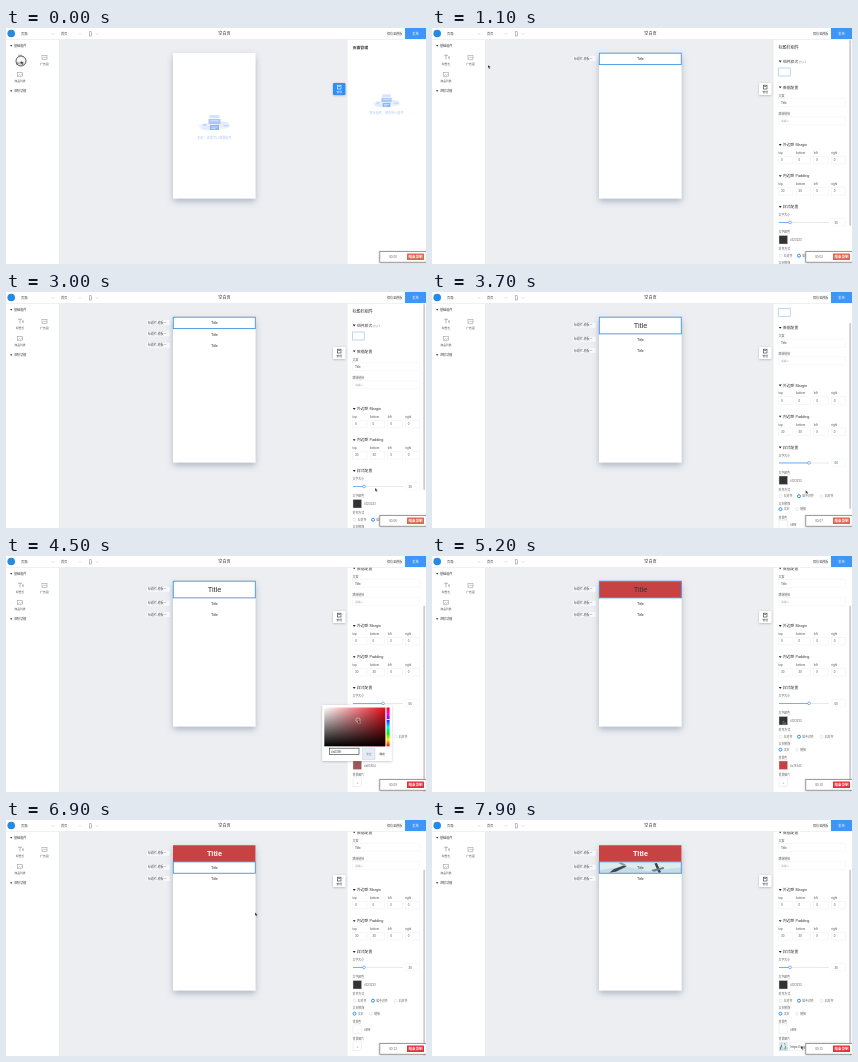
Write an HTML page that moves like this. It is 420 by 236 pixels and loops after 8000 ms.

```html
<!DOCTYPE html>
<html lang="en">
<head>
<meta charset="utf-8">
<title>Page builder</title>
<style>
html, body { margin: 0; width: 100%; height: 100%; overflow: hidden; background: #fff; }
svg { display: block; width: 100vw; height: 100vh; font-family: "Liberation Sans", "Noto Sans CJK SC", "Noto Sans CJK", sans-serif; }
</style>
</head>
<body>
<svg id="stage" viewBox="0 0 420 236">
  <defs>
    <linearGradient id="sat"><stop stop-color="#fff"/><stop offset="1" stop-color="#e5101c"/></linearGradient>
    <linearGradient id="dark" x2="0" y2="1"><stop stop-color="#000" stop-opacity="0"/><stop offset="1"/></linearGradient>
    <linearGradient id="hue" x2="0" y2="1">
      <stop stop-color="#f00"/><stop offset=".17" stop-color="#f0f"/><stop offset=".33" stop-color="#22f"/>
      <stop offset=".5" stop-color="#0ef"/><stop offset=".67" stop-color="#0e0"/><stop offset=".83" stop-color="#fe0"/><stop offset="1" stop-color="#f00"/>
    </linearGradient>
    <filter id="shadow" x="-30%" y="-30%" width="160%" height="160%"><feDropShadow dx="0" dy="3" stdDeviation="3" flood-color="#64748c" flood-opacity=".45"/></filter>
    <filter id="soft" x="-30%" y="-30%" width="160%" height="160%"><feDropShadow dx="0" dy=".6" stdDeviation="1" flood-opacity=".25"/></filter>
    <clipPath id="panelClip"><rect x="341" y="11.5" width="79" height="225"/></clipPath>
  </defs>
  <g id="scene"></g>
</svg>
<script>
const LOOP = 8000, STEP = 100, BLUE = '#2f8ff0', INK = '#444', PALE = '#a9c5f3';
const scene = document.getElementById('scene');

const rect = (x, y, w, h, fill = 'none', more = '') =>
  `<rect x="${x}" y="${y}" width="${w}" height="${h}" fill="${fill}" ${more}/>`;
const circle = (x, y, r, fill = 'none', more = '') =>
  `<circle cx="${x}" cy="${y}" r="${r}" fill="${fill}" ${more}/>`;
const path = (d, stroke = INK, width = .5, fill = 'none') =>
  `<path d="${d}" stroke="${stroke}" stroke-width="${width}" fill="${fill}"/>`;
const text = (x, y, s, size = 3.1, fill = INK, more = '') =>
  `<text x="${x}" y="${y}" font-size="${size}" fill="${fill}" ${more}>${s}</text>`;
const mid = (x, y, s, size, fill, more = '') => text(x, y, s, size, fill, `text-anchor="middle" ${more}`);
const edge = (color, w = .4) => `stroke="${color}" stroke-width="${w}"`;
const chevron = x => path(`M${x} 5.4l1 1 1-1`, '#999', .4);
const heading = (y, s) => path(`M346.8 ${y - 2.2}h2.8l-1.4 1.8z`, 'none', 0, '#222') + text(351, y, s, 3.8, '#333');

// Linear interpolation through rows of [time, ...values]
function follow(rows, t) {
  const i = rows.findIndex(r => r[0] > t);
  if (i < 0) return rows.at(-1).slice(1);
  if (i === 0) return rows[0].slice(1);
  const a = rows[i - 1], b = rows[i], k = (t - a[0]) / (b[0] - a[0]);
  return a.slice(1).map((v, j) => v + (b[j + 1] - v) * k);
}

const CURSOR = [
  [0, 15, 33], [200, 60, 40], [600, 205, 60], [800, 205, 40], [1100, 56, 37], [1200, 15, 32], [1300, 15, 32],
  [1600, 200, 42], [1800, 53, 39], [1950, 15, 32], [2050, 15, 32], [2400, 200, 54], [2700, 212, 32],
  [3000, 369, 196], [3100, 358, 195], [3500, 377, 195], [3800, 372, 200], [4000, 351, 209], [4300, 345, 175],
  [4500, 352, 164], [4700, 372, 158], [4900, 376, 198], [5200, 351, 165], [5500, 340, 190], [5900, 362, 182],
  [6200, 319, 172], [6500, 376, 217], [6800, 215, 48], [7200, 351, 226], [7900, 369, 226]
];
const SCROLL = [[3550, 0], [3850, 47]];
const SIZE = [[3100, 3.7], [3500, 7.4]];

function state(t) {
  const drags = [[0, 600], [1250, 1600], [2000, 2400]];
  const count = drags.filter(d => t >= d[1]).length;
  const big = follow(SIZE, t)[0];
  const red = t >= 4900, white = t >= 6500, photo = t >= 7500;
  return {
    t, count, big, red, white, photo,
    drag: drags.some(d => t >= d[0] && t < d[1]),
    selected: t >= 6800 ? 1 : t >= 2700 ? 0 : count - 1,
    scroll: follow(SCROLL, t)[0],
    picker: t >= 4000 && t < 4900 ? 'back' : t >= 5300 && t < 6500 ? 'ink' : '',
    cursor: follow(CURSOR, t)
  };
}

function header() {
  return rect(0, 0, 420, 11, '#fff') + rect(0, 11, 420, .5, '#dfe2e8') + circle(5.2, 5.5, 3.8, '#228be6') +
    text(15, 7, '页面:', 3.2) + chevron(46) + text(55, 7, '首页', 3.2) + chevron(73) +
    rect(83.2, 3.8, 2.6, 4.2, 'none', edge('#666')) + chevron(90) +
    mid(218.5, 7.4, '空白页', 4.1, '#333') + text(381, 7, '保存至模板', 3.1) +
    rect(399, 0, 21, 11, '#3c97f8') + mid(409.5, 7, '发布', 3.2, '#fff');
}

function sidebar() {
  const image = (x, y) => rect(x - 2.5, y - 2, 5, 4, 'none', edge('#777')) + path(`M${x - 2} ${y + 1.3}l1.5-1.6 1 .9 1-.9 1 1.4`, '#777', .35);
  return rect(0, 11.5, 53, 225, '#fff') + rect(53, 11.5, .4, 225, '#dfe2e8') +
    path('M4 17h2.4l-1.2 1.6z', 'none', 0, '#222') + text(8, 19, '基础组件', 3.1, '#333') +
    path('M12 27.2h4M14 27.2v4.2M16 29h2M17 29v2.4', '#777', .5) + mid(14, 36.6, '标题栏', 2.8) +
    image(38.5, 29.2) + mid(38.5, 36.6, '广告图', 2.8) +
    image(14, 46.6) + mid(14, 53.6, '商品列表', 2.8) +
    path('M4 62.2h2.4l-1.2 1.6z', 'none', 0, '#222') + text(8, 64.3, '进阶功能', 3.1, '#333');
}

function emptyArt(x, y, k) {
  const blob = (dx, dy, rx, ry, fill) => `<ellipse cx="${dx}" cy="${dy}" rx="${rx}" ry="${ry}" fill="${fill}"/>`;
  return `<g transform="translate(${x} ${y}) scale(${k})">` + blob(0, 2, 16, 3.5, '#edf3fd') + blob(-7, 4, 7, 2, '#e2ecfc') +
    blob(7, 0, 8, 2.4, '#e2ecfc') + rect(-5, -9, 10, 3.2, '#d5e4fb') + rect(-6, -5, 12, 5, '#a9c8f7') +
    rect(-4.5, 1, 9, 5, '#8db5f4') + path('M-4-3.2H4M-3 3H3M-3 4.6H1', '#e9f1fe', .7) +
    rect(-12, 0, 4, 2, '#c4d9fa') + rect(9, 1, 5, 1.6, '#c4d9fa') + '</g>';
}

function photoArt(y, x = 167.5, w = 82, h = 11.5) {
  const px = f => x + f * w, py = f => y + f * h;
  const shape = (fill, pts) => `<polygon fill="${fill}" points="${pts.map(p => px(p[0]) + ',' + py(p[1])).join(' ')}"/>`;
  return rect(x, y, w, h, '#dcecef') + shape('#c5dce2', [[0, .7], [.3, .4], [.6, .8], [1, .5], [1, 1], [0, 1]]) +
    shape('#40484b', [[.12, .95], [.17, .65], [.3, .3], [.33, .4], [.2, .85]]) +
    shape('#8a9899', [[.23, .1], [.27, .05], [.33, .3], [.3, .35]]) +
    shape('#394346', [[.67, .15], [.7, .1], [.75, .9], [.72, .95]]) +
    shape('#727f81', [[.63, .7], [.78, .45], [.79, .6], [.66, .85]]);
}

function phone(s) {
  let out = rect(53.4, 11.5, 288, 225, '#eceef2') + rect(167, 25, 82.5, 145.5, '#fff', 'filter="url(#shadow)"');
  if (!s.count) return out + emptyArt(208.5, 96, 1) + mid(208.5, 111.3, '你好，这里可以放置组件', 3.1, PALE);
  let y = 25.2, outline = '';
  for (let i = 0; i < s.count; i++) {
    const size = i ? 3.7 : s.big, h = 11.4 + (size - 3.7) * 1.42;
    if (!i && s.red) out += rect(167, y, 82.5, h, '#c74343');
    if (i === 1 && s.photo) out += photoArt(y);
    const white = !i && s.white;
    out += mid(208.5, y + h / 2 + size * .35, 'Title', size, white ? '#fff' : '#333', white ? 'font-weight="bold"' : '');
    const ty = y + h / 2 - 2.4;
    out += rect(141, ty - .5, 22.5, 5, '#f7f8fa', 'rx=".6"') + text(142, ty + 3, '标题栏-模板一', 2.9, '#555');
    if (i === s.selected) outline = rect(167.3, y, 82, h, 'none', edge('#3f92e6', .9));
    y += h;
  }
  return out + outline;
}

function manageButton(s) {
  const on = !s.count, c = on ? '#fff' : '#333';
  return rect(327, 55, 12.4, 12, on ? BLUE : '#fff', 'rx="1" filter="url(#soft)"') +
    rect(331.6, 57.2, 3.4, 3.8, 'none', edge(c, .6)) + path('M332.3 58.5h2', c, .6) + mid(333.2, 65, '管理', 2.7, c);
}

function fourFields(y, title, values) {
  return heading(y, title) + ['top', 'bottom', 'left', 'right'].map((name, i) => {
    const x = 346.5 + i * 17.6;
    return text(x, y + 7.6, name, 3, '#555') + rect(x, y + 10, 14.5, 7.6, '#fff', edge('#e9ebef')) +
      text(x + 2.5, y + 15, values[i], 3, '#555');
  }).join('');
}

function radios(y, options) {
  return options.map(([x, name, on]) =>
    circle(x, y - 1.1, 1.5, '#fff', edge(on ? BLUE : '#ccc', on ? 1 : .4)) + text(x + 3.2, y, name, 2.9, '#555')).join('');
}

function panel(s) {
  let out = rect(341, 11.5, 79, 225, '#fff') + rect(341, 11.5, .4, 225, '#dfe2e8');
  if (!s.count) return out + text(346.5, 21, '页面管理', 3.9, '#333', 'font-weight="bold"') +
    emptyArt(380.5, 74, .85) + mid(380.5, 86.3, '暂无组件，请先拖入组件', 3.1, PALE);
  const first = s.selected === 0, size = first ? s.big : 3.7;
  const knob = 358 + (size - 3.7) / 3.7 * 19;
  const picking = s.picker === 'back';
  const back = !first ? '#ffffff' : s.red ? '#c74343' : picking && s.t > 4200 ? '#a05654' : '#ffffff';
  const ink = first && (s.white || s.picker === 'ink') ? '#ffffff' : '#323233';
  const swatch = (y, fill, label) => rect(347, y, 8.6, 8.5, fill, edge('#ddd')) + text(358, y + 5.6, label, 3, '#666');
  out += `<g clip-path="url(#panelClip)"><g transform="translate(0 ${-s.scroll})">` +
    text(346.5, 21, '标题栏组件', 4.1, '#333', 'font-weight="500"') +
    heading(34.8, '组件样式') + text(367, 34.6, '默认1', 2.8, '#999') +
    rect(346.7, 40, 11.5, 8, '#fff', edge('#8abcf2', .6)) +
    heading(60.7, '数据配置') + text(346.5, 68.6, '文案', 2.9, '#555') +
    rect(346.5, 70.6, 67, 8, '#fff', edge('#eceef1')) + text(349, 75.8, 'Title', 3.1) +
    text(346.5, 86.6, '跳转链接', 2.9, '#555') + rect(346.5, 88.4, 67, 8, '#fff', edge('#eceef1')) + text(349, 93.7, '请输入', 2.8, '#aaa') +
    fourFields(118.3, '外边距 Margin', [0, 0, 0, 0]) + fourFields(149.4, '内边距 Padding', [30, 30, 0, 0]) +
    heading(180.3, '样式配置') + text(346.5, 188, '文字大小', 2.9, '#555') +
    rect(347, 194, 50, .9, '#e4e7ed') + rect(347, 194, knob - 347, .9, '#67acf5') +
    circle(knob, 194.4, 1.4, '#fff', edge(BLUE, .6)) +
    rect(400, 190.5, 13.5, 7.4, '#fff', edge('#eceef1')) + text(402.5, 195.6, Math.round(36 + (size - 3.7) * 8), 3, '#555') +
    text(346.5, 205.4, '文字颜色', 2.9, '#555') + swatch(207.5, ink, s.white && first ? ink : '#323233') +
    text(346.5, 222.4, '对齐方式', 2.9, '#555') + radios(228.8, [[348.5, '左对齐'], [367, '居中对齐', 1], [389.5, '右对齐']]) +
    text(346.5, 236, '文本修饰', 2.9, '#555') + radios(241.8, [[348.5, '文本', 1], [365, '链接']]) +
    text(346.5, 250, '背景色', 2.9, '#555') + swatch(252, back, back) +
    text(346.5, 267, '背景图片', 2.9, '#555') + rect(347, 269, 8.6, 8.5, '#fff', edge('#ddd')) +
    (!first && s.photo
      ? photoArt(269, 347, 8.6, 8.5) + rect(357, 269, 56, 8.5, '#fff', edge('#d5e4f5')) + text(358.5, 274.6, 'https://img', 3.2)
      : mid(351.3, 274.6, '+', 4, '#999')) +
    '</g></g>';
  return out + rect(417.3, 12 + s.scroll * .8, 1.8, 186, '#c9ccd1', 'rx=".9"');
}

function picker(s) {
  if (!s.picker) return '';
  const back = s.picker === 'back', y = back ? 149 : 168.5;
  const [cx, cy] = s.cursor;
  const inside = cx > 318 && cx < 379 && cy > y + 2.5 && cy < y + 41;
  return rect(316.3, y, 69.5, 56, '#fff', 'filter="url(#soft)"') +
    rect(318.3, y + 2.5, 61, 38.8, 'url(#sat)') + rect(318.3, y + 2.5, 61, 38.8, 'url(#dark)') +
    rect(380.6, y + 2.5, 3, 38.8, 'url(#hue)') + rect(380.2, back ? y + 14 : y + 3, 3.8, 1, '#fff', edge('#888', .2)) +
    (inside ? circle(cx, cy, 2.2, 'none', edge('#eee', .5)) : '') +
    rect(323.5, y + 43.2, 29.5, 6.2, '#fff', edge('#333', .6)) + text(325, y + 47.5, back ? '#a03f3f' : '#323233', 3) +
    rect(356.5, y + 43, 12.5, 11.6, '#e6ecf5', edge('#b9cce6')) + mid(362.7, y + 50, '清空', 2.8, '#789') +
    mid(376.3, y + 50, '确定', 2.8, '#333');
}

function recorder(t) {
  const clock = '00:' + String(Math.floor(t / 500)).padStart(2, '0');
  return rect(373.8, 223.6, 46.5, 10.6, '#fff', edge('#777', .7) + ' filter="url(#soft)"') +
    mid(387, 230.1, clock, 3.1, '#666') +
    rect(401, 225.4, 17, 6.6, t < 3800 ? '#e2634f' : '#e92d35', 'rx=".6"') + mid(409.5, 230, '结束录制', 3.5, '#fff', 'font-weight="bold"');
}

function pointer(s) {
  const [x, y] = s.cursor;
  const ring = s.drag ? circle(x, y, 5, 'rgba(255,255,255,.7)', edge('#333', .8)) + mid(x, y + 2.8, '标题栏', 2.5, '#222') : '';
  return ring + path(`M${x} ${y}v3.4l.9-.8.7 1.4.7-.3-.7-1.4h1.2z`, '#fff', .25, '#222');
}

let shown = -1;
function frame(now) {
  const t = Math.floor(now % LOOP / STEP) * STEP;
  if (t !== shown) {
    shown = t;
    const s = state(t);
    scene.innerHTML = phone(s) + sidebar() + panel(s) + header() + manageButton(s) + picker(s) + recorder(t) + pointer(s);
  }
  requestAnimationFrame(frame);
}
const start = performance.now();
const tick = () => { frame.call(null, performance.now() - start); };
requestAnimationFrame = (raf => () => raf(tick))(requestAnimationFrame.bind(window));
tick();
</script>
</body>
</html>
```
